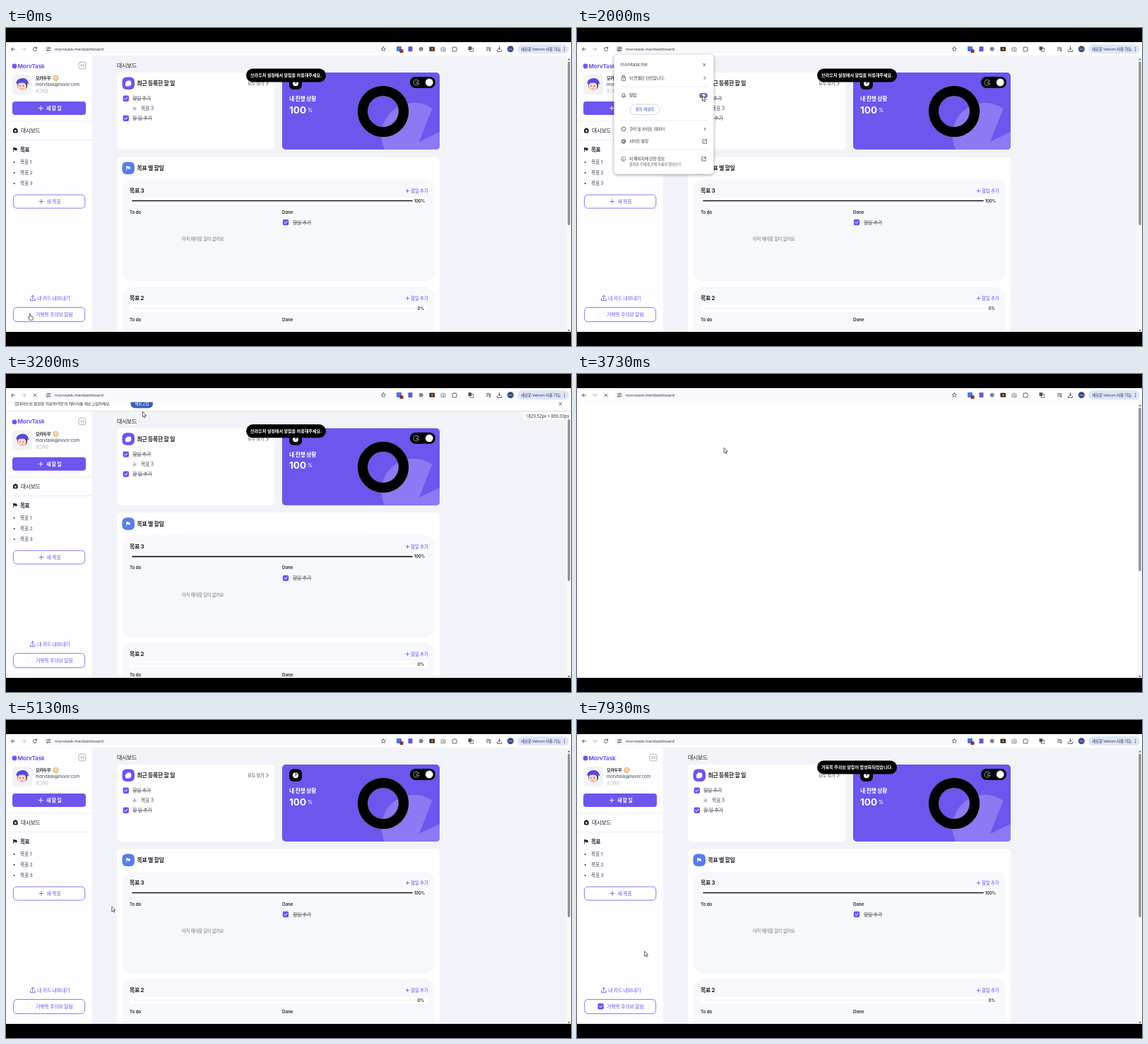
Write an HTML page that moves like this. It is 800 px wide and 450 px high and loops after 8000 ms.

```html
<!DOCTYPE html>
<html lang="ko">
<head>
<meta charset="utf-8">
<style>
html, body { margin: 0; width: 100%; height: 100%; overflow: hidden; background: #000; }
svg { display: block; }
#stage { width: 800px; height: 450px; }
text { font-family: Inter, "Noto Sans CJK KR", "Noto Sans CJK", sans-serif; white-space: pre; }
.ui { font-family: "Open Sans", "Noto Sans CJK KR", "Noto Sans CJK", sans-serif; }
</style>
</head>
<body>
<svg id="stage" viewBox="0 0 800 450"></svg>
<script>
const LOOP = 8000;
const PURPLE = '#6b56ee', INK = '#20222b';

// Markup helpers; text is placed by its vertical centre.
const text = (x, y, size, str, fill = INK, weight = 400, extra = '') => {
  const spacing = /[가-힣]/.test(str) ? -0.05 : -0.01;
  return `<text x="${x}" y="${y + size * 0.365}" font-size="${size}" fill="${fill}" font-weight="${weight}" letter-spacing="${spacing * size}" ${extra}>${str}</text>`;
};
const rect = (x, y, w, h, r, fill, extra = '') =>
  `<rect x="${x}" y="${y}" width="${w}" height="${h}" rx="${r}" fill="${fill}" ${extra}/>`;
const dot = (x, y, r, fill, extra = '') => `<circle cx="${x}" cy="${y}" r="${r}" fill="${fill}" ${extra}/>`;
const line = (d, color = INK, w = 0.9, extra = '') =>
  `<path d="${d}" fill="none" stroke="${color}" stroke-width="${w}" stroke-linecap="round" stroke-linejoin="round" ${extra}/>`;
const shape = (d, fill, extra = '') => `<path d="${d}" fill="${fill}" ${extra}/>`;
const group = (id, body, extra = '') => `<g id="${id}" ${extra}>${body}</g>`;
const plus = (x, y, color, r = 3, w = 0.9) => line(`M${x - r} ${y}h${2 * r}M${x} ${y - r}v${2 * r}`, color, w);
const chevron = (x, y, s = 2, color = '#333') => line(`M${x - s / 2} ${y - s}l${s} ${s}l${-s} ${s}`, color, 0.9);
const cross = (x, y, s = 2) => line(`M${x - s} ${y - s}l${2 * s} ${2 * s}m0 ${-2 * s}l${-2 * s} ${2 * s}`, '#444', 0.8);
const flag = (x, y, color) => line(`M${x} ${y - 2.7}v5.6`, color, 0.8) +
  shape(`M${x} ${y - 2.8}h2.6l.5 .8h2v3.2h-2.6l-.5-.7h-2z`, color);
const check = (x, y) => rect(x - 4.2, y - 4.2, 8.4, 8.4, 2, PURPLE) +
  line(`M${x - 1.9} ${y}l1.4 1.5l2.6-2.9`, '#fff', 1);
const struck = (x, y, str) => text(x, y, 7, str, '#555a66', 400, 'text-decoration="line-through"');

const sidebar = () => `<svg id="side" width="122" height="450">
  ${rect(0, 39, 122, 411, 0, '#fefdff')}
  ${line('M0 132H122M0 158.5H122', '#e9e9ef', 0.8)}
  ${group('sideLeft',
    dot(12, 54, 3.4, PURPLE) + text(16.5, 53.7, 8, 'MorvTask', PURPLE, 700) +
    rect(9, 66, 28, 28, 5, '#f3f3f6') +
    dot(23, 81, 7.2, '#2b2940') + dot(22.5, 82.5, 6.2, '#fbd5cd') +
    shape('M14.5 79C14 69.5 30 68 31.5 77L33 79.5Q24 76 14.5 79Z', '#5b48d8') +
    dot(20, 82, 0.7, '#222') + dot(24.5, 82, 0.7, '#222') + line('M21 86q1.5 .8 3 0', '#c55', 0.6) +
    text(42, 70.5, 6.1, '모카두부', INK, 600) + dot(70.5, 71, 4.2, '#e9bd8b') + dot(70.5, 70.5, 2.2, '#f8dfb9') +
    text(42, 80, 6.1, 'morvtask@nuvor.com', '#3c3f49') + text(42, 89.5, 5.2, '로그아웃', '#a3a6af') +
    rect(10, 142.5, 6.6, 6, 1.6, INK) + rect(11.6, 141.6, 3.4, 2, 0.7, INK) + dot(13.3, 145.6, 1.3, '#fff') +
    text(21, 145, 7.8, '대시보드', INK, 500) +
    flag(10.5, 172, INK) + text(20, 172, 7.6, '목표', INK, 600) +
    [1, 2, 3].map(n => dot(11.7, 175 + 15 * n, 1, INK) + text(20, 175 + 15 * n, 6.8, '목표 ' + n, '#42454f')).join(''))}
  ${group('fold', rect(103, 48.3, 10, 9.6, 2.5, '#fff', 'stroke="#8d909a" stroke-width=".7"') +
    line('M107.4 51.4l-1.8 1.7l1.8 1.7M110.6 51.4l-1.8 1.7l1.8 1.7', '#666', 0.7))}
  ${rect(9, 104, 104, 19, 4, PURPLE, 'id="taskBox"')}
  ${rect(10.4, 236, 101.4, 19, 5, '#fff', `id="goalBox" stroke="${PURPLE}" stroke-width=".8"`)}
  ${group('boxText', plus(49.3, 113.5, '#fff') + text(57, 113.5, 7.1, '새 할 일', '#fff', 600) +
    plus(50, 245.5, PURPLE) + text(57.5, 245.5, 7.1, '새 목표', PURPLE, 500))}
  ${group('sideFoot', line('M34.5 383v2.7h6.6v-2.7M37.8 384v-5.4M35.6 380.6l2.2-2.2l2.2 2.2', PURPLE, 0.9) +
    text(44, 382.5, 7.1, '내 카드 내보내기', PURPLE, 500) +
    rect(10.6, 395.4, 101, 20.2, 5, '#fff', `stroke="${PURPLE}" stroke-width=".8"`) +
    rect(29.5, 401, 8.2, 8.2, 2, '#fff', 'stroke="#efeff3" stroke-width=".7"') +
    group('alarmOn', check(33.6, 405.3)) + text(42, 405.3, 7.1, '거북목 주의보 알림', PURPLE, 500))}
</svg>`;

const goalCard = (y, title, h) => rect(165, y, 442, h, 15, '#f6f8fc') +
  text(175, y + 16, 8, title, INK, 700) +
  plus(568.5, y + 16, PURPLE, 2.3, 0.8) + text(573, y + 16, 6.6, '할일 추가', PURPLE, 500) +
  rect(175, y + 25.3, 422, 9.4, 4.7, '#fff') + line(`M180 ${y + 30}H580`, '#eeeaee', 0.9);
const columns = y => text(175, y, 6.2, 'To do', INK, 600) + text(391, y, 6.2, 'Done', INK, 600);

const dashboard = () => text(157, 53, 8, '대시보드', INK, 500) +
  rect(157, 63, 223.5, 109, 5, '#fefeff') +
  rect(164.5, 69.5, 17.5, 17.5, 6, PURPLE) + rect(170.6, 74.6, 6.6, 7, 1.8, '#fff') + rect(168.9, 76.3, 6.6, 6.2, 1.8, '#fff') +
  text(185.5, 78.3, 8, '최근 등록한 할 일', INK, 600) +
  text(342, 78.3, 6.3, '모두 보기', '#444') + chevron(370, 78.3, 2.3) +
  group('recent', check(169.8, 99.8) + struck(179, 99.8, '할일 추가') +
    dot(182, 113.8, 3.8, '#eef0f6') + shape('M182 111.3l2.4 4.3h-4.8z', '#a7aec2') +
    text(191, 113.8, 7, '목표 3', '#4a4d58') + check(169.8, 127.8) + struck(179, 127.8, '할 일 추가')) +
  group('recentWait', rect(372.2, 93, 1, 38, 0.5, '#d9dbe2')) +
  rect(391, 63, 223, 109, 5, PURPLE) +
  shape('M536 172A46 46 0 0 1 603.500 114L585 161L614 147V167Q614 172 609 172Z', '#8c79f3') +
  rect(401, 69.5, 18, 17.5, 6, '#08080c') + dot(410, 78.3, 4, '#fff') +
  line('M410 78.3V74.300M410 78.300L413 75.500', '#08080c', 0.8) +
  rect(572, 69, 36, 16, 8, '#000') + dot(599.3, 77, 5.4, '#fff') +
  line('M584.600 75.500a4 4 0 1 0 .2 2.700h-3.800l2.600-3.500', '#ddd', 0.7) +
  text(401, 100, 8, '내 진행 상황', '#fff', 600) +
  `<text y="120.600" x="401" font-size="13.500" font-weight="700" fill="#fff"><tspan id="percent">100</tspan><tspan font-size="7" font-weight="600" dx="2" dy="-2">%</tspan></text>` +
  dot(534, 118, 29, 'none', 'stroke="#fff" stroke-width="14.500"') +
  dot(534, 118, 29, 'none', 'id="ring" stroke="#000" stroke-width="14.500" pathLength="100"') +
  rect(157, 182.5, 457, 270, 5, '#fefeff') +
  rect(164.5, 189.5, 17.5, 17.5, 6, '#587de9') + flag(170.7, 198.3, '#fff') +
  text(185.5, 198, 8, '목표 별 할일', INK, 600) +
  goalCard(214.5, '목표 3', 144.5) + goalCard(366.5, '목표 2', 144.5) +
  text(592, 396.6, 5.6, '0%', INK, 600, 'text-anchor="end"') +
  group('goalReady', line('M179 244.5H575', '#12131a', 1.7, 'id="bar" pathLength="100"') +
    text(578, 244.5, 5.6, '100%', INK, 600) + columns(260.3) + columns(412.3) +
    text(249, 298.5, 6.3, '아직 해야할 일이 없어요', '#777b85') +
    check(396, 275) + struck(406, 275, '할일 추가')) +
  group('goalWait', text(592, 244.5, 5.6, '0%', INK, 600, 'text-anchor="end"') +
    text(277.5, 292, 6.9, '할일 목록 로딩중...', '#444852', 400, 'text-anchor="middle"') +
    text(493.5, 292, 6.9, '완료 목록 로딩중...', '#444852', 400, 'text-anchor="middle"'));

const page = () => group('page', rect(0, 39, 800, 411, 0, '#f1f3f8') + dashboard() + sidebar() +
  rect(794, 39, 6, 400, 0, '#fafafb') + shape('M795 45.500l2-2.500l2 2.500z', '#666') +
  rect(795.4, 47.5, 3.2, 231.5, 1.6, '#8a8a8c') +
  group('toast', rect(-56.5, -9.5, 113, 19, 9.5, '#000') +
    text(0, 0, 6.15, '', '#fff', 700, 'id="toastText" text-anchor="middle"')) +
  group('blank', rect(0, 39, 794, 411, 0, '#fff')) +
  group('sizeTip', rect(733, 40, 67, 10.5, 0, '#fff') +
    text(736, 45.4, 6.2, ' ', '#333', 400, 'id="sizeText" class="ui"'))) +
  shape('M795 427l2 2.500l2-2.500z', '#666');

const infobar = () => group('infobar', rect(0, 39, 800, 21, 0, '#fff') +
  text(12, 49.3, 5.9, '업데이트된 설정을 적용하려면 이 페이지를 새로고침하세요.', '#333', 400, 'class="ui"') +
  rect(176.5, 43, 31.5, 12.5, 6.2, '#3d5fb8') +
  text(192.2, 49.3, 5.7, '새로고침', '#fff', 400, 'class="ui" text-anchor="middle"') + cross(785, 49.3));

const toolbar = () => rect(0, 20, 800, 19.5, 0, '#fff') + line('M0 39.500H800', '#eceef3', 0.5) +
  line('M12.500 30h-5M9.700 27.700l-2.300 2.300l2.300 2.300', '#444') +
  line('M22.500 30h5M25.300 27.700l2.300 2.300l-2.300 2.300', '#b5b7bc') +
  group('reload', line('M43.200 28.400a2.600 2.600 0 1 0 .4 2.200M43.600 26.900v1.900h-1.900', '#444')) +
  group('stop', cross(41, 30)) +
  rect(53, 23.3, 492, 13, 6.5, '#f8f9fd') +
  dot(60, 29.8, 4.6, '#e9ecf5', 'id="siteSpot"') +
  line('M57.500 28.300h2.500M57.500 31.500h.5M60.500 31.500h2.300M62.500 28.300h.3', '#444', 0.8) +
  dot(61.2, 28.3, 0.9, 'none', 'stroke="#444" stroke-width=".7"') + dot(59, 31.5, 0.9, 'none', 'stroke="#444" stroke-width=".7"') +
  text(69, 29.8, 6.1, 'morvtask.me/dashboard', '#2b2d33', 400, 'class="ui"') +
  line('M534.300 26.500l.9 2.100l2.300.2l-1.700 1.500l.5 2.200l-2-1.200l-2 1.200l.5-2.200l-1.700-1.500l2.300-.2z', '#444', 0.7) +
  rect(553, 26, 7, 7, 1, '#4a77e0') + rect(557.5, 30.2, 5, 5, 1, '#8d3434') +
  rect(569.5, 26.3, 6, 7, 1, '#6355d8') + dot(587.7, 29.8, 3, '#7f8594') +
  rect(599.5, 26.8, 7.5, 6, 0.5, '#3a2a20') + dot(603.5, 29.8, 1.5, '#e38333') +
  line('M616.500 28.200h1.200l.7-1h1.600l.7 1h1.200v4.500h-5.400z', '#666', 0.8) + dot(619.2, 30.3, 1.1, '#777') +
  line('M632.500 27.500h1.600a1 1 0 0 1 2 0h1.600v1.700a1 1 0 0 1 0 2v1.800h-5.200z', '#444', 0.8) +
  rect(654.5, 26.2, 4.8, 5, 0.6, '#555') + line('M659.500 28.500h2.200v4.800h-4.500v-2', '#555', 0.8) +
  line('M680.300 27.500h4.600M680.300 29.500h4.600M680.300 31.500h2M685.800 28v4', '#444', 0.8) + dot(685, 32, 1, '#444') +
  line('M698.500 26.500v4M696.700 29l1.800 1.800l1.800-1.800M695.500 31.500v1.800h6v-1.800', '#444') +
  dot(714.3, 29.8, 4.5, '#354a86') + line('M712 30h4.600', '#b8c3e4', 0.9) +
  rect(724, 23.3, 73, 13, 6.5, '#dfe6fa') +
  text(729, 29.8, 5.8, '새로운 Velrom 사용 가능', '#2a3457', 400, 'class="ui"') +
  [27.6, 29.8, 32].map(y => dot(790.7, y, 0.65, '#333')).join('');

const popupText = (x, y, str, size = 5.9, fill = '#33353b') => text(x, y, size, str, fill, 400, 'class="ui"');
const external = (x, y) => line(`M${x - .5} ${y - 2.7}h-2.200v5.400h5.400v-2.200M${x + .7} ${y - 2.7}h2v2M${x + 2.600} ${y - 2.600}l-3 3`, '#444', 0.75);
const popup = () => group('popup', rect(52.5, 37.8, 141, 169, 5, '#fff', 'style="filter:drop-shadow(0 1px 2px #0006)"') +
  popupText(61.5, 52, 'morvtask.me', 6.4) + cross(180.3, 52, 1.8) +
  rect(63.2, 69.5, 5.4, 4.8, 0.6, 'none', 'stroke="#444" stroke-width=".8"') + line('M64.400 69.500v-1.200a1.500 1.500 0 0 1 3 0v1.200', '#444', 0.8) + dot(65.9, 71.9, 0.6, '#444') +
  popupText(74, 70.5, '이 연결은 안전합니다.') + chevron(181, 70.7, 1.8) +
  line('M61.500 83H184.500M61.500 131H184.500M61.500 172.500H184.500', '#e2e5ec', 0.7) +
  line('M63.300 97h5.200M64 97v-2.400a1.900 1.900 0 0 1 3.800 0v2.400M65.500 98.500h.8', '#444', 0.8) +
  popupText(74, 95, '알림') + rect(173, 92, 12, 7.2, 3.6, '#9aa0ac', 'id="switchBox"') + dot(176.7, 95.6, 2, '#e8ecfa', 'id="switchKnob"') +
  rect(75.4, 108, 41.6, 14.6, 7.3, '#fff', 'stroke="#b9c3de" stroke-width=".7"') + popupText(82.3, 115.2, '권한 재설정', 5.9, '#4561a8') +
  dot(65.9, 143, 2.9, 'none', 'stroke="#444" stroke-width=".8"') + dot(65, 142.3, 0.5, '#444') + dot(66.8, 144, 0.5, '#444') +
  popupText(74, 142.8, '쿠키 및 사이트 데이터') + chevron(181, 143, 1.8) +
  dot(65.9, 160.5, 2.5, 'none', 'stroke="#444" stroke-width="1.500" stroke-dasharray="1.300 .7"') + dot(65.9, 160.5, 1.6, 'none', 'stroke="#444" stroke-width=".7"') +
  popupText(74, 160.3, '사이트 설정') + external(180.8, 160.5) +
  line('M67.500 183a2.900 2.900 0 1 0 1.200 2.200M65.900 185v1.600M68.200 182.500v.1', '#444', 0.8) +
  popupText(74, 185, '이 페이지에 관한 정보') + external(179.5, 185.3) +
  popupText(74, 193, '출처와 주제에 관해 자세히 알아보기', 5.3, '#666a73'));

const OUTLINE = 'stroke="#222" stroke-width=".7" stroke-linejoin="round"';
const cursor = () => group('cursor',
  group('arrow', shape('M0 0V7.300L1.700 5.800L2.900 8.300L4 7.800L2.900 5.300H5.100Z', '#fff', OUTLINE)) +
  group('hand', shape('M-.9 .7Q0-.6 .8 .7V3.700L3.700 4.500Q4.500 4.800 4.300 6L3.600 9.300H-.7L-2.700 6.300Q-2.600 5-.9 6Z', '#fff', OUTLINE)) +
  group('beam', line('M-1.300-3.500Q0-3.500 0-2.800V2.800Q0 3.500-1.300 3.500M1.300-3.500Q0-3.500 0-2.800M0 2.800Q0 3.500 1.300 3.500', '#444', 0.7)));

const stage = document.getElementById('stage');
stage.innerHTML = page() + infobar() + toolbar() + popup() + cursor() +
  rect(0, 0, 800, 20, 0, '#000') + rect(0, 430, 800, 20, 0, '#000');

const parts = {};
stage.querySelectorAll('[id]').forEach(el => parts[el.id] = el);
const set = (id, attrs) => { for (const k in attrs) parts[id].setAttribute(k, attrs[k]); };
const move = (id, x, y = 0) => set(id, { transform: `translate(${x} ${y})` });
const show = (id, on) => { parts[id].style.display = on ? '' : 'none'; };

const ramp = (t, from, to) => Math.min(1, Math.max(0, (t - from) / (to - from)));
const smooth = p => p * p * (3 - 2 * p);
const bezier = (x1, y1, x2, y2) => p => {
  const at = (a, b, s) => 3 * (1 - s) ** 2 * s * a + 3 * (1 - s) * s * s * b + s ** 3;
  let lo = 0, hi = 1;
  for (let i = 0; i < 20; i++) {
    const mid = (lo + hi) / 2;
    if (at(x1, x2, mid) < p) lo = mid; else hi = mid;
  }
  return at(y1, y2, lo);
};
const toastEase = bezier(0.21, 1.02, 0.73, 1);

// Pointer path: time, x, y
const PATH = [
  [0, 34, 404], [200, 34, 404], [950, 60, 30], [1200, 60, 30], [1850, 177.5, 96], [2150, 177.5, 96],
  [2480, 172, 69], [2610, 172, 69], [2950, 193.5, 53.5], [3300, 193.5, 53.5], [4250, 227.5, 171.5],
  [4700, 227.5, 171.5], [5700, 32, 404], [6950, 32, 404], [7700, 95.5, 327], [LOOP, 95.5, 327]
];
const pointer = t => {
  const i = PATH.findIndex(k => k[0] > t);
  const [t0, x0, y0] = PATH[i - 1], [t1, x1, y1] = PATH[i];
  const p = smooth(ramp(t, t0, t1));
  return [x0 + (x1 - x0) * p, y0 + (y1 - y0) * p];
};

function draw(t) {
  const reloaded = t >= 3450;
  const ready = !reloaded || t >= 4600;

  const barHeight = 21 * (ramp(t, 2554, 2704) - ramp(t, 3150, 3300));
  const offset = t > 2680 ? barHeight : 0;
  move('infobar', 0, barHeight - 21);
  show('infobar', barHeight > 0);
  move('page', 0, offset);
  show('sizeTip', t > 2680 && t < 3450);
  parts.sizeText.textContent = `1829.52px × ${((391 - offset) * 865.71 / 377).toFixed(2)}px`;
  const loading = t >= 3150 && t < 4200;
  show('stop', loading);
  show('reload', !loading);
  show('blank', reloaded && t < 3850);

  const width = reloaded ? 122 - 94 * (1 - ramp(t, 4200, 4557)) ** 3 : 122;
  const d = width - 122;
  set('side', { width });
  move('sideLeft', d / 2);
  move('fold', d);
  move('boxText', d);
  move('sideFoot', d / 2, -offset);
  set('taskBox', { x: 9 + d / 2, width: 104 + d });
  set('goalBox', { x: 10.4 + d / 2, width: 101.4 + d });
  show('alarmOn', t >= 6400);

  const percent = reloaded ? Math.floor(ramp(t, 4090, 5090) * 100) : 100;
  parts.percent.textContent = percent;
  set('ring', { 'stroke-dasharray': percent >= 100 ? 'none' : `${percent} 100` });
  show('ring', percent > 0);
  show('recent', ready);
  show('recentWait', !ready);
  show('goalReady', ready);
  show('goalWait', !ready);
  const filled = reloaded ? 100 * smooth(ramp(t, 4600, 4900)) : 100;
  set('bar', { 'stroke-dasharray': `${filled} 200` });

  const enter = reloaded ? toastEase(ramp(t, 6316, 6666)) : 1;
  show('toast', !reloaded || t >= 6316);
  set('toast', {
    transform: `translate(396.5 ${67 - 38 * (1 - enter)}) scale(${0.6 + 0.4 * enter})`,
    opacity: 0.5 + 0.5 * enter
  });
  parts.toastText.textContent = reloaded ? '거북목 주의보 알림이 활성화되었습니다.' : '브라우저 설정에서 알림을 허용해주세요.';

  const open = t >= 1250 && t < 2420;
  show('popup', open);
  set('siteSpot', { fill: open ? '#c9cedb' : '#e9ecf5' });
  const on = ramp(t, 1930, 2050);
  set('switchBox', { fill: `rgb(${154 - 92 * on} ${160 - 65 * on} ${172 + 12 * on})` });
  set('switchKnob', { cx: 176.7 + 4.6 * on });

  const [x, y] = pointer(t);
  const overButton = x > 11 && x < 112 && y > 395;
  const overText = t > 2440 && t < 2680;
  move('cursor', x, y);
  show('hand', overButton);
  show('beam', overText);
  show('arrow', !overButton && !overText);
}

const start = performance.now();
function tick() {
  draw((performance.now() - start) % LOOP);
  requestAnimationFrame(tick);
}
tick();
</script>
</body>
</html>
```
